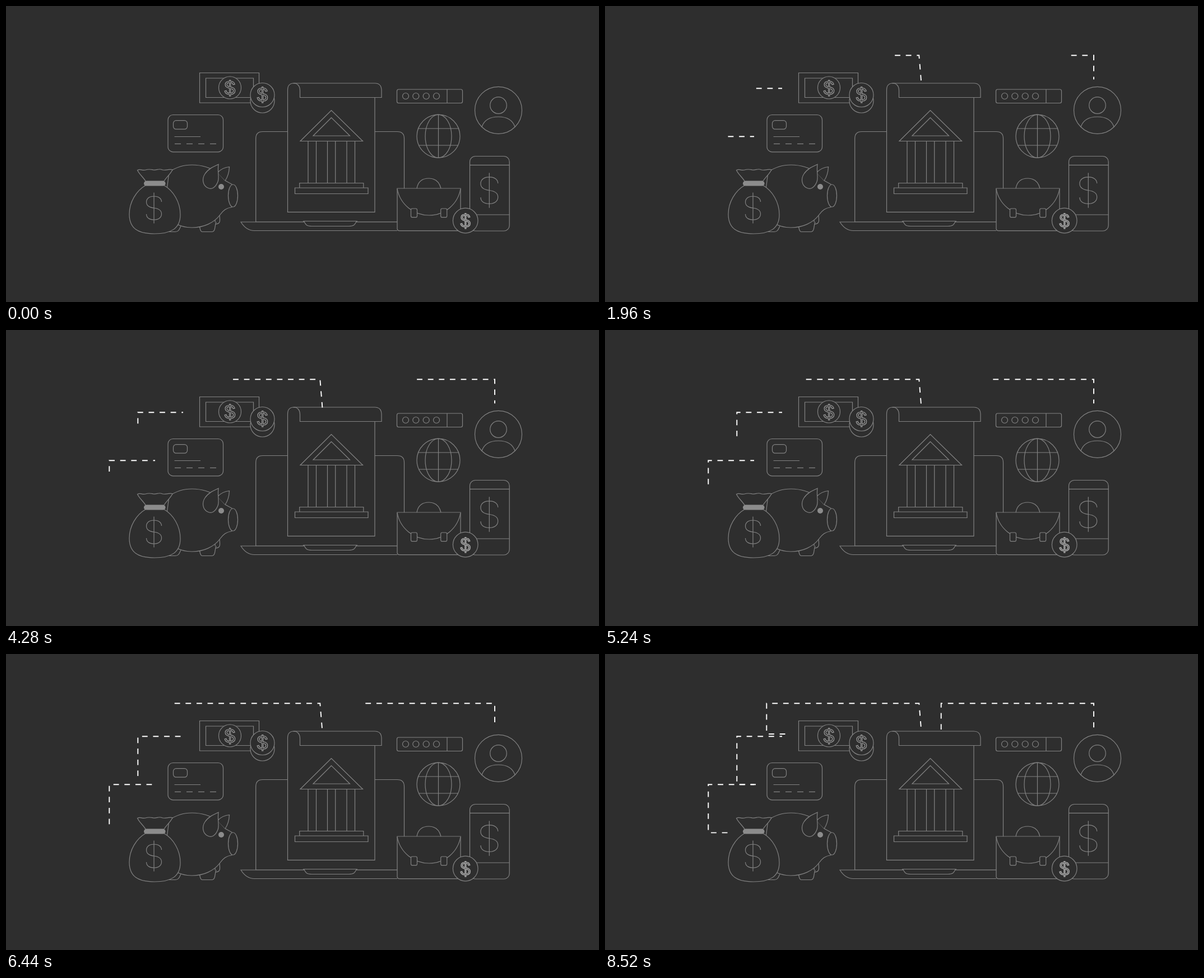
An HTML page for the animation above (9.68 s loop, 1058 by 529 pixels).

```html
<!DOCTYPE html>
<html lang="en">
<head>
<meta charset="utf-8">
<title>Banking line icons</title>
<style>
  html, body { margin: 0; width: 100%; height: 100%; overflow: hidden; background: #2e2e2e; }
  svg { display: block; width: 100vw; height: 100vh; }
  .icons { fill: #2e2e2e; stroke: #828282; stroke-width: 1.2; }
  .line { fill: none; }
  .solid { fill: #8c8c8c; stroke: none; }
  .thin * { fill: none; vector-effect: non-scaling-stroke; }
  text { font-family: "Liberation Sans", Arial, sans-serif; font-size: 35px; text-anchor: middle; stroke: #a0a0a0; }
  #trails { fill: none; stroke: #fff; stroke-width: 1.9; stroke-dasharray: 9.8 9.8; }
</style>
</head>
<body>
<svg viewBox="0 0 1058 529">
  <defs>
    <g id="dollar" class="thin">
      <path d="M0-27.5V27.5M13.5-11C13.5-17 8-21 0-21S-13.5-17-13.5-10.5C-13.5-4-8-1 0 0S13.5 4 13.5 10.500C13.500 17 8 21 0 21S-13.500 17.500-13.500 11"/>
    </g>
  </defs>
  <g class="icons">
    <!-- banknote and coins -->
    <path d="M345.500 119.500H451.500V173H345.500ZM356.500 129H441.500V163.500H356.500Z"/>
    <circle cx="399.500" cy="146" r="20"/>
    <text x="399.500" y="158.500">$</text>
    <circle cx="457.500" cy="169.500" r="21.500"/>
    <circle cx="457.500" cy="159" r="21.500"/>
    <text x="457.500" y="170.500" stroke="#8c8c8c">$</text>

    <!-- card -->
    <rect x="289" y="194.500" width="98.500" height="66.300" rx="9"/>
    <rect x="298.500" y="204.700" width="25" height="15.500" rx="5"/>
    <path d="M300.500 233.500H347"/>
    <path d="M301 246.300H375" stroke-dasharray="11 10"/>

    <!-- piggy bank -->
    <path d="M373 382C374 389 371 390 374 390C383 389 382 384 381 374"/>
    <path d="M344 391C347 394 345 403 350 403.500H368C374 403 372 393 375 386M288 403.500H302C310 403 309 397 313 392"/>
    <path d="M291 297C303 288 316 284 332 284C350 284 365 289 378 298L391 312L403 318.500V359.500C393 361 388 365 382 373C371 388 352 396 332 396C308 396 290 384 282 366Z"/>
    <path d="M377 298C383 292 390 288 398.500 287.500C398 298 396 305 391 312"/>
    <path d="M379 283C377 296 381 307 378 314C374 324 367 329 360 325C351 321 349 309 355 300C361 291 370 287 379 283Z"/>
    <ellipse cx="405" cy="339" rx="8.500" ry="20"/>
    <circle class="solid" cx="384" cy="323" r="5"/>

    <!-- money bag -->
    <path d="M249 313C245 306 238 301 234.500 293.500C240 290 243 295 249 293S258 292 263 293S273 290 278 292.500S289 291 297 292.500C294 300 286 306 282 313Z"/>
    <path d="M250 320C232 330 220 351 220 372C220 398 236 407 265 407S311 398 311 373C311 351 299 330 281 320Z"/>
    <rect class="solid" x="246" y="312.800" width="38.500" height="8.700" rx="4.300"/>
    <use href="#dollar" x="264" y="361"/>

    <!-- laptop -->
    <path d="M445.700 386V237Q445.700 224.500 458 224.500H698Q710.500 224.500 710.500 237V386Z"/>
    <path d="M698 386H419C424 394 431 401.500 443 401.500H698"/>
    <path d="M531 384.500H626C622 388 624 393.500 612 393.500H545C533 393.500 535 388 531 384.500Z"/>

    <!-- document -->
    <path d="M513 138C506 138 502.500 143 502.500 150V368.300H658V150Z"/>
    <path d="M513 138H658C666 138 670 143 670 151V163.500H524.500V151C524.500 143 520 138 513 138Z"/>
    <path d="M580.500 186.500L525 241.500H636.500ZM580.500 199.500L548 232H613.500Z"/>
    <path d="M539 241.500V316.500M553.500 241.500V316.500M573.500 241.500V316.500M587.700 241.500V316.500M608 241.500V316.500M622.500 241.500V316.500"/>
    <path d="M523.700 316.500H637.800V325H523.700ZM515.500 325H646V335.500H515.500Z"/>

    <!-- password field -->
    <rect x="697.500" y="149" width="117" height="24.500" rx="3"/>
    <path d="M787 149V173.500"/>
    <circle cx="713" cy="161" r="5.500"/><circle cx="731.300" cy="161" r="5.500"/>
    <circle cx="749.700" cy="161" r="5.500"/><circle cx="768" cy="161" r="5.500"/>

    <!-- user -->
    <circle cx="878.500" cy="186.300" r="42"/>
    <circle cx="878.500" cy="177.500" r="14.800"/>
    <path class="line" d="M849 216C853 204 864 198 878.500 198S904 204 908 216"/>

    <!-- globe -->
    <circle cx="771.500" cy="232.700" r="38.500"/>
    <ellipse cx="771.500" cy="232.700" rx="23.500" ry="38.500"/>
    <path d="M771.500 194V271M735.500 219H807.500M736.700 249H806.300"/>

    <!-- phone -->
    <rect x="827.500" y="268.500" width="70.700" height="133.500" rx="10"/>
    <path d="M827.500 284.300H898M827.500 373H898"/>
    <use href="#dollar" transform="translate(862.300 329.500) scale(1.140)"/>

    <!-- briefcase -->
    <path d="M733 326C735 314 743 308 754.500 308S773 314 776 326"/>
    <path d="M698 326.200H811V401.700H702Q698 401.700 698 397.500Z"/>
    <path d="M698 326.500C703 355 728 374 755 374S806 355 811 326.500"/>
    <rect x="722.500" y="362" width="11" height="15.700" rx="2.500"/>
    <rect x="775.700" y="362" width="11" height="15.700" rx="2.500"/>
    <circle cx="819.700" cy="383.500" r="22.300"/>
    <text x="819.700" y="394.500" style="font-size:33px;fill:#666;stroke:#b0b0b0">$</text>
  </g>
  <g id="trails"></g>
</svg>
<script>
  const LOOP = 9680, GROW = 8520, STEP = 40;

  // Each trail grows from its first point to its last.
  const routes = [
    [[266, 233.3], [184.3, 233.3], [184.3, 319.4], [218.5, 319.4]],
    [[316, 147.2], [235.3, 147.2], [235.3, 233.3], [269, 233.3]],
    [[564.5, 139.5], [560.3, 88.2], [288.3, 88.2], [288.3, 143], [321.5, 143]],
    [[872, 131.3], [872, 88.2], [599.7, 88.2], [599.7, 135]]
  ];

  const distance = ([ax, ay], [bx, by]) => Math.hypot(bx - ax, by - ay);

  const group = document.getElementById("trails");
  const trails = routes.map(points => {
    const path = document.createElementNS("http://www.w3.org/2000/svg", "path");
    group.appendChild(path);
    const total = points.slice(1).reduce((sum, p, i) => sum + distance(points[i], p), 0);
    return { points, path, total };
  });

  // The path runs backwards from the moving tip, so the dashes travel with it.
  function trimmed(points, length) {
    const kept = [points[0]];
    for (let i = 1; i < points.length && length > 0; i++) {
      const a = points[i - 1], b = points[i], d = distance(a, b);
      const k = Math.min(1, length / d);
      kept.unshift([a[0] + (b[0] - a[0]) * k, a[1] + (b[1] - a[1]) * k]);
      length -= d;
    }
    return "M" + kept.map(p => p.join(" ")).join("L");
  }

  function render(ms) {
    const time = Math.floor((ms % LOOP) / STEP) * STEP;
    const progress = Math.min(1, time / GROW);
    for (const { points, path, total } of trails) {
      path.setAttribute("d", progress ? trimmed(points, total * progress) : "");
    }
  }

  const start = performance.now();
  function tick() {
    render(performance.now() - start);
    requestAnimationFrame(tick);
  }
  tick();
</script>
</body>
</html>
```
